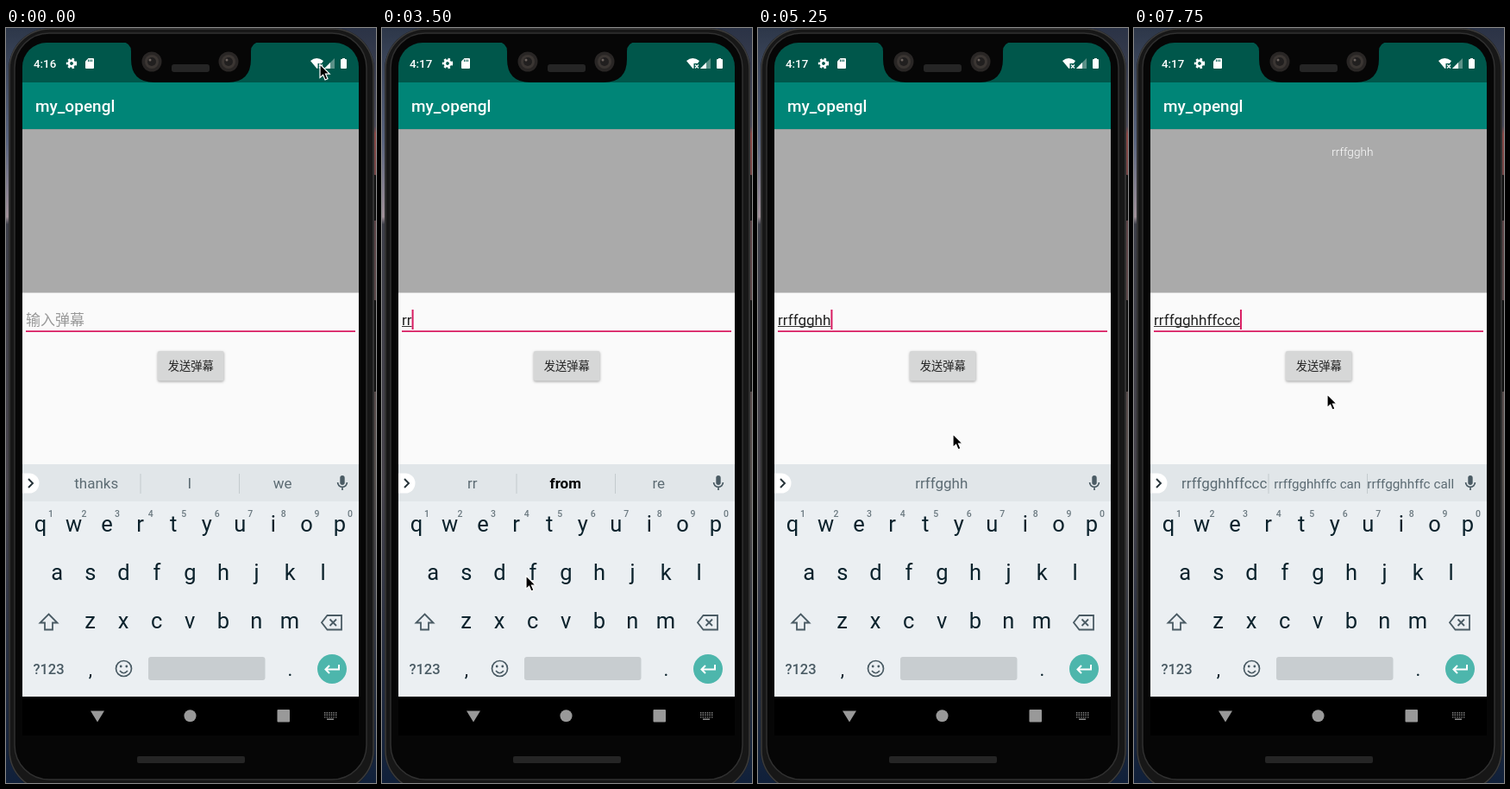
An HTML page with a canvas that plays this animation: 429x874 px, repeating every 8000 ms.

```html
<!DOCTYPE html>
<html lang="zh-CN">
<head>
<meta charset="utf-8">
<style>
  html, body { margin: 0; width: 100%; height: 100%; overflow: hidden; background: #111; }
  canvas { display: block; }
</style>
</head>
<body>
<canvas id="stage" width="429" height="874"></canvas>
<script>
const ctx = document.getElementById('stage').getContext('2d');
const LOOP = 8000, STEP = 250;
const LATIN = 'Roboto, sans-serif';
const HAN = '"Noto Sans CJK SC", "Noto Sans CJK JP", "Noto Sans CJK", sans-serif';
const INK = '#0b222c', SLATE = '#4a5b64', PINK = '#d81b60';
const PITCH = 38.55;

// Pointer path: time, x, y
const path = [
  [0, 364, 42], [250, 350, 58], [1000, 222, 151], [1250, 222, 151], [2000, 110, 345],
  [2250, 92, 368], [2500, 89, 337], [3000, 152, 575], [3250, 152, 577], [3500, 167, 634],
  [4000, 167, 634], [4250, 210, 632], [4500, 257, 628], [4750, 257, 628], [5000, 246, 568],
  [5250, 226, 470], [5500, 217, 394], [5750, 217, 394], [6250, 229, 579], [6500, 170, 635],
  [6750, 170, 635], [7000, 176, 671], [7250, 176, 671], [7500, 232, 495], [7750, 224, 424]
];

// Key strokes: time, letter, whether the key preview shows
const strokes = [
  [3000, 'r', 1], [3250, 'r', 0], [3750, 'f', 1], [4000, 'f', 0], [4250, 'g', 1], [4500, 'g', 0],
  [4750, 'h', 1], [5000, 'h', 0], [6500, 'f', 1], [6750, 'f', 0], [7000, 'c', 1], [7250, 'c', 1], [7500, 'c', 0]
];

const rows = [['qwertyuiop', 40, 583], ['asdfghjkl', 59.3, 639], ['zxcvbnm', 97.6, 695]];
const shortHints = {
  '': ['thanks', 'I', 'we'], r: ['r', 'are', 're'], rr: ['rr', '*from', 're'],
  rrf: ['rrf', '*from', 'ref'], rrff: ['rrff', '*from', 'off']
};

function rect(x, y, w, h, color, radius = 0) {
  ctx.fillStyle = color;
  ctx.beginPath();
  ctx.roundRect(x, y, w, h, radius);
  ctx.fill();
}

function disc(x, y, r, color) {
  ctx.fillStyle = color;
  ctx.beginPath();
  ctx.arc(x, y, r, 0, Math.PI * 2);
  ctx.fill();
}

function shape(d, fill, stroke, width = 1.6) {
  const p = new Path2D(d);
  if (fill) { ctx.fillStyle = fill; ctx.fill(p); }
  if (stroke) { ctx.strokeStyle = stroke; ctx.lineWidth = width; ctx.stroke(p); }
}

function text(str, x, y, size, color, { align = 'left', weight = 400, family = LATIN } = {}) {
  ctx.font = `${weight} ${size}px ${family}`;
  ctx.textAlign = align;
  ctx.fillStyle = color;
  ctx.fillText(str, x, y);
  return ctx.measureText(str).width;
}

function gradient(x0, y0, x1, y1, colors) {
  const g = ctx.createLinearGradient(x0, y0, x1, y1);
  colors.forEach(([at, c]) => g.addColorStop(at, c));
  return g;
}

function drawPhone() {
  rect(0, 0, 215, 874, gradient(0, 0, 0, 874, [[0, '#2d3749'], [.15, '#59647f'], [.25, '#a0919a'],
    [.26, '#3c3e48'], [.6, '#46434b'], [1, '#10203a']]));
  rect(215, 0, 214, 874, gradient(0, 0, 0, 874, [[0, '#2b3346'], [.13, '#4a4a58'], [.14, '#8b4846'],
    [.25, '#5e4548'], [.6, '#56504e'], [1, '#10203a']]));
  rect(425, 170, 4, 53, '#111', 1);
  rect(425, 315, 4, 106, '#111', 1);
  rect(3, 0, 424, 884, '#171717', 48);
  ctx.strokeStyle = '#3b3b3b';
  ctx.lineWidth = 1.5;
  ctx.beginPath();
  ctx.roundRect(4, 1, 422, 882, 47);
  ctx.stroke();
  rect(10, 6, 408, 864, '#060606', 40);
  ctx.strokeStyle = '#303030';
  ctx.lineWidth = 1.5;
  ctx.beginPath();
  ctx.roundRect(10, 6, 408, 864, 40);
  ctx.stroke();
  rect(152, 843, 125, 8, '#252525', 2);
}

function drawNotch() {
  shape('M134 16Q145 17 145 27V36Q145 63 172 63H257Q284 63 284 36V27Q284 17 295 16Z', '#060606');
  for (const x of [169, 258]) {
    disc(x, 39, 11.5, '#292625');
    disc(x, 39, 8, '#3b3633');
    disc(x, 39, 5, '#211f1f');
    disc(x - 2, 37, 1.5, '#6b625d');
  }
  rect(192, 42, 44, 9, '#252525', 3);
}

function drawStatus(t) {
  text(t < 750 ? '4:16' : '4:17', 32, 46, 13.3, '#fff', { weight: 500 });
  ctx.setLineDash([2.4, 2.31]);
  shape('M81 41A5 5 0 1 1 71 41A5 5 0 1 1 81 41', null, '#fff', 2.4);
  ctx.setLineDash([]);
  shape('M79.2 41A3.2 3.2 0 1 1 72.8 41A3.2 3.2 0 1 1 79.2 41', null, '#fff', 2.6);
  shape('M95.5 35H101Q102 35 102 36V46Q102 47 101 47H93Q92 47 92 46V38.5Z', '#fff');
  for (const x of [95, 97, 99]) rect(x, 36.5, 1, 2.5, '#00574b');
  shape('M353 38Q360 32 368 38L366 41H361.5V46.5L360.5 47Z', '#fff');
  shape('M363 42.5L367 46.5M367 42.5L363 46.5', null, '#fff', 1.3);
  shape('M381 35V47H369Z', '#5b9188');
  shape('M376 40V47H369Z', '#fff');
  rect(388, 36, 7, 11, '#fff', 1);
  rect(390, 35, 3, 2, '#fff');
}

function drawApp(t, typed) {
  rect(19, 63, 390, 54, '#008577');
  text('my_opengl', 34, 97, 19, '#fff', { weight: 500 });
  rect(19, 117, 390, 189.5, '#aaa');
  rect(19, 117, 390, 1, '#9c9f9e');
  if (t >= 5500) text('rrffgghh', 347 - (t - 6250) * .0785, 148, 13.6, '#fff', { weight: 300 });

  let end = 23;
  if (typed) {
    const width = text(typed, 23, 343.5, 17.1, '#202020');
    rect(23, 345, width, 1, '#333');
    end += width;
  } else {
    text('输入弹幕', 23, 343.5, 17, '#999', { family: HAN });
  }
  const caretOn = t < 2750 ? Math.floor(t / 500) % 2 : t < 5500 || t >= 6000;
  if (caretOn) rect(end, 326, 2, 23, PINK);
  rect(23, 350.3, 382, 1.7, PINK);

  ctx.shadowColor = 'rgba(0,0,0,.35)';
  ctx.shadowBlur = 3;
  ctx.shadowOffsetY = 1;
  rect(176, 374, 76.5, 34.5, '#d6d7d7', 2);
  ctx.shadowColor = 'transparent';
  text('发送弹幕', 214.3, 396, 13.3, '#222', { align: 'center', weight: 500, family: HAN });
}

function drawHints(typed) {
  const n = typed.length;
  const hints = shortHints[typed] || (n < 11 ? ['', typed, '']
    : [typed, typed.slice(0, n - 2) + ' can', typed.slice(0, n - 2) + ' call']);
  rect(19, 505, 390, 43, '#e1e6e9');
  if (hints[0]) for (const x of [155.5, 270]) rect(x, 516, 1, 23, '#c3cace');
  hints.forEach((hint, i) => {
    const strong = hint[0] === '*';
    const word = strong ? hint.slice(1) : hint;
    const weight = strong ? 700 : 400;
    ctx.font = `${weight} 17px ${LATIN}`;
    // Long suggestions shrink to stay inside their slot.
    const size = 17 * Math.min(1, 101 / ctx.measureText(word).width);
    text(word, 104.7 + i * 108, 533.3, size, strong ? '#000' : '#5c6b73', { align: 'center', weight });
  });
  shape('M19 515.5H27A11.5 11.5 0 0 1 27 538.5H19Z', '#fff');
  shape('M26 522L31 527L26 532', null, '#253238', 1.9);
  rect(387.3, 518, 5.4, 11, SLATE, 2.7);
  shape('M384.6 526A5.4 5.4 0 0 0 395.4 526M390 531.5V535', null, SLATE, 1.7);
}

function drawKeyboard() {
  rect(19, 548, 390, 226, '#ebeff2');
  for (const [letters, x, y] of rows) {
    [...letters].forEach((c, i) => text(c, x + i * PITCH, y, 25.5, INK, { align: 'center' }));
  }
  [...'1234567890'].forEach((d, i) =>
    text(d, 52 + i * PITCH, 565.5, 10.5, '#6b7980', { align: 'center', weight: 500 }));

  shape('M49.5 678.5L59.5 688.5H54V696.5H45V688.5H39.5Z', null, SLATE, 1.8);
  shape('M372.5 680H389V696.5H372.5L366 688.2ZM375.5 684.5L383 692M383 684.5L375.5 692', null, SLATE, 1.8);
  text('?123', 49.5, 748, 16.5, SLATE, { align: 'center', weight: 500 });
  text(',', 98, 750, 22, INK, { align: 'center' });
  text('.', 329.5, 750, 22, INK, { align: 'center' });
  shape('M145.5 741.5A9 9 0 1 1 127.5 741.5A9 9 0 1 1 145.5 741.5M132 744Q136.5 749.5 141 744', null, SLATE, 1.7);
  disc(133.2, 739, 1.4, SLATE);
  disc(139.8, 739, 1.4, SLATE);
  rect(165, 728, 135.5, 27, '#c8cdd0', 3);
  disc(378, 742, 17, '#4db6ac');
  shape('M386 737V742.5H370.5M375 738L370.5 742.5L375 747', null, '#fff', 2);
}

function drawPreview(letter) {
  const [letters, x0, base] = rows.find(r => r[0].includes(letter));
  const x = x0 + letters.indexOf(letter) * PITCH;
  ctx.shadowColor = 'rgba(0,0,0,.35)';
  ctx.shadowBlur = 5;
  ctx.shadowOffsetY = 2;
  rect(x - 19.5, base - 97, 39, 112, '#dce0e3', 3);
  ctx.shadowColor = 'transparent';
  text(letter, x, base - 60, 27, SLATE, { align: 'center' });
  if ('rc'.includes(letter)) for (let i = 0; i < 3; i++) rect(x + 7.5 + i * 3, base - 51, 1.6, 1.6, SLATE);
}

function drawNavigation() {
  rect(19, 774, 390, 45, '#000');
  shape('M98 790.5H114L106 803.5Z', '#999');
  disc(213.5, 796.2, 7, '#999');
  rect(314.5, 789, 14.5, 14.5, '#999', 1);
  for (let row = 0; row < 3; row++) {
    for (let col = 0; col < 6; col++) rect(369 + col * 2.6, 792 + row * 2.6, 1.4, 1.4, '#888');
  }
  rect(372, 799.5, 8, 1.4, '#888');
}

function drawPointer(t) {
  const i = Math.max(1, path.findIndex(p => p[0] >= t));
  const [t0, x0, y0] = path[i - 1], [t1, x1, y1] = path[i];
  const k = (t - t0) / (t1 - t0);
  ctx.save();
  ctx.translate(x0 + (x1 - x0) * k, y0 + (y1 - y0) * k);
  shape('M0 0V15.5L3.6 12.3L6 18L9 16.7L6.5 11.2H11.2Z', '#000', '#fff', 1.2);
  ctx.restore();
}

function draw(t) {
  const typed = strokes.filter(s => s[0] <= t).map(s => s[1]).join('');
  const active = strokes.find(s => s[0] === t && s[2]);
  drawPhone();
  ctx.save();
  ctx.beginPath();
  ctx.roundRect(19, 17, 390, 802, [28, 28, 0, 0]);
  ctx.clip();
  rect(19, 17, 390, 47, '#00574b');
  rect(19, 306, 390, 200, '#fafafa');
  drawApp(t, typed);
  drawHints(typed);
  drawKeyboard();
  if (active) drawPreview(active[1]);
  drawNavigation();
  ctx.restore();
  drawNotch();
  drawStatus(t);
  drawPointer(t);
}

let shown = -1;
function tick() {
  const t = Math.floor(performance.now() % LOOP / STEP) * STEP;
  if (t !== shown) draw(shown = t);
  requestAnimationFrame(tick);
}
tick();
</script>
</body>
</html>
```
